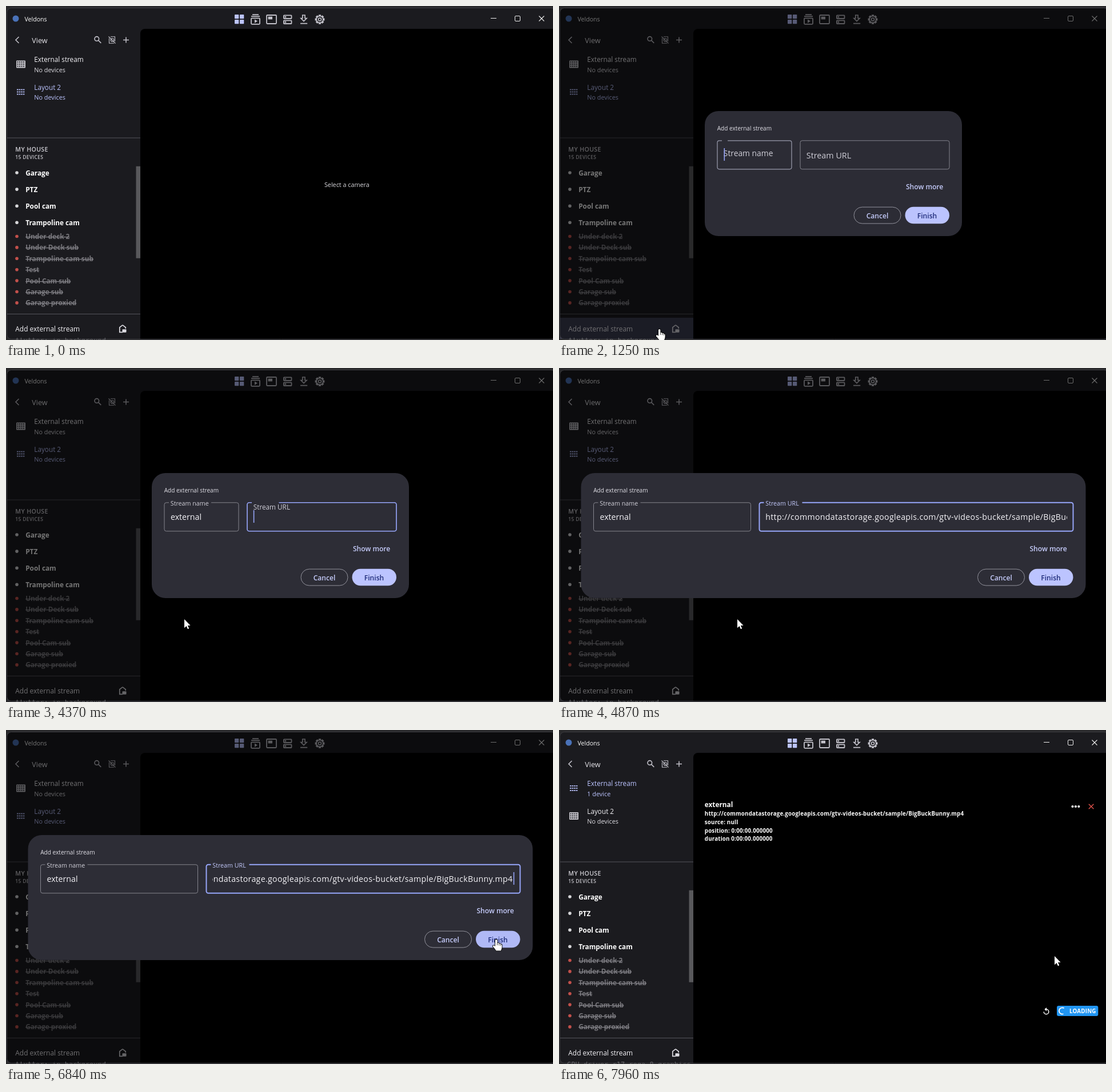
Animation, 957 px wide and 585 px high, one loop 8000 ms. Source, as an HTML page with a canvas:

```html
<!DOCTYPE html>
<html lang="en">
<head>
<meta charset="utf-8">
<title>Camera viewer</title>
<style>
html, body { margin: 0; width: 100%; height: 100%; overflow: hidden; background: #000; }
canvas { display: block; }
</style>
</head>
<body>
<canvas id="stage" width="957" height="585"></canvas>
<script>
const c = document.getElementById('stage').getContext('2d');
const LOOP = 8000;
const BG = '#1b1b1f', DIALOG = '#2d2d36', LILAC = '#bcc4ff', FOCUS = '#97a6fa';
const LINE = '#85858e', ICON = '#c3c2ca', TEXT = '#f4f3f7', RULE = '#55545c';
const URL_TEXT = 'http://commondatastorage.googleapis.com/gtv-videos-bucket/sample/BigBuckBunny.mp4';
const CAMS = ['Garage', 'PTZ', 'Pool cam', 'Trampoline cam'];
const OFFLINE = ['Under deck 2', 'Under Deck sub', 'Trampoline cam sub', 'Test',
  'Pool Cam sub', 'Garage sub', 'Garage proxied'];
const TYPED = [3080, 3200, 3300, 3400, 3570, 3600, 3770, 3920];
// Times at which the text caret switches on and off in turn.
const BLINKS = [1215, 1700, 2200, 2680, 3080, 5440, 5950, 6400, 6840, 7400];
const MOUSE = [
  [500, 184, 586], [750, 176, 566], [1620, 176, 566], [2400, 285, 456],
  [2600, 285, 456], [2740, 312, 440], [5290, 312, 440], [5480, 612, 409],
  [5620, 612, 409], [6070, 846, 407], [6220, 846, 407], [6580, 858, 367],
  [7750, 858, 367], [7960, 867, 396]];

const clamp = v => Math.max(0, Math.min(1, v));
const ramp = (t, a, b) => clamp((t - a) / (b - a));
const mix = (a, b, p) => a + (b - a) * p;
const smooth = p => p * p * (3 - 2 * p);
const easeOut = p => 1 - (1 - p) ** 2.4;

function setFont(size, weight = 400, gap = 0) {
  c.font = `${weight} ${size}px "Open Sans", "Noto Sans", sans-serif`;
  c.letterSpacing = gap + 'px';
}
function text(s, x, y, size, color = TEXT, weight = 400, gap = 0, align = 'left') {
  setFont(size, weight, gap);
  c.textAlign = align;
  c.fillStyle = color;
  c.fillText(s, x, Math.round(y));
  return c.measureText(s).width;
}
function box(x, y, w, h, color, r = 0) {
  c.fillStyle = color;
  c.beginPath();
  c.roundRect(x, y, w, h, r);
  c.fill();
}
function frame(x, y, w, h, color, r = 0, lw = 1) {
  c.strokeStyle = color;
  c.lineWidth = lw;
  c.beginPath();
  c.roundRect(x, y, w, h, r);
  c.stroke();
}
function dot(x, y, r, color) {
  c.fillStyle = color;
  c.beginPath();
  c.arc(x, y, r, 0, 7);
  c.fill();
}
function arc(x, y, r, from, to, color, lw) {
  c.strokeStyle = color;
  c.lineWidth = lw;
  c.beginPath();
  c.arc(x, y, r, from, to);
  c.stroke();
}
function path(d, x, y, color, lw = 0) {
  c.save();
  c.translate(x, y);
  const p = new Path2D(d);
  if (lw) {
    c.strokeStyle = color;
    c.lineWidth = lw;
    c.stroke(p);
  } else {
    c.fillStyle = color;
    c.fill(p);
  }
  c.restore();
}

function gear(x, y) {
  c.fillStyle = ICON;
  c.beginPath();
  for (let i = 0; i < 8; i++) {
    for (const [a, r] of [[-.36, 6.3], [-.23, 8.6], [.23, 8.6], [.36, 6.3]]) {
      const q = i * Math.PI / 4 + a;
      c.lineTo(x + r * Math.cos(q), y + r * Math.sin(q));
    }
  }
  c.closePath();
  c.moveTo(x + 5, y);
  c.arc(x, y, 5, 0, 2 * Math.PI, true);
  c.fill();
  arc(x, y, 2.5, 0, 7, ICON, 1.6);
}

function titleBar() {
  dot(17, 22, 5.5, '#4a72b8');
  text('Veldons', 32.5, 27, 10.6, '#fff');
  for (const x of [400, 409]) for (const y of [15, 24]) box(x, y, 7.3, 7.3, LILAC, .8);
  frame(429, 21.4, 15, 10.4, ICON, 1.2, 1.8);
  path('M429 18.2H444M431 15.2H442', 0, 0, ICON, 1.7);
  path('M435 23.5V29.7L440 26.6Z', 0, 0, ICON);
  frame(456, 16, 17, 15, ICON, 1.2, 1.8);
  box(458.6, 18.6, 7.4, 4.8, ICON);
  for (const y of [16.3, 25.3]) {
    frame(485.9, y, 13.6, 5.7, ICON, .8, 1.8);
    dot(488.9, y + 2.85, 1.3, ICON);
  }
  path('M518.8 16H523V21.5H526L521 26.5L516 21.5H518.8ZM515 30.6H527.2', 0, 0, ICON, 1.7);
  gear(549, 23.5);
  path('M848 21.5H858', 0, 0, '#eee', 1);
  frame(890.5, 17.5, 9, 9, '#eee', 1.5);
  path('M932.5 17.5L941.5 26.5M941.5 17.5L932.5 26.5', 0, 0, '#eee', 1.1);
}

function layoutRow(name, sub, y, active) {
  text(name, 49.3, y + 4, 11.75, active ? LILAC : TEXT);
  text(sub, 49.3, y + 21.8, 10.85, active ? LILAC : '#dedde3');
  if (active) {
    for (let i = 0; i < 12; i++) box(19 + i % 4 * 3.6, y + 3 + (i / 4 | 0) * 4, 2.6, 1.8, LILAC);
  } else {
    box(18, y + 1.5, 16, 13, '#c8c7cd', 1);
    for (let i = 0; i < 12; i++) box(19.4 + i % 4 * 3.5, y + 3 + (i / 4 | 0) * 3.7, 2.2, 2.2, '#3a3a40');
  }
}

function sidebar(t, added) {
  path('M22.5 54L17 59.5L22.5 65', 0, 0, ICON, 1.6);
  text('View', 45.3, 64.6, 12.6, '#e6e5ea');
  arc(158.8, 57.4, 3.8, 0, 7, ICON, 1.6);
  path('M161.6 60.2L166.3 64.9', 0, 0, ICON, 1.6);
  path('M180.5 56.5V65.3H189M183 53.7H190.5V62M179.5 53.5L191.5 65.5', 0, 0, ICON, 1.1);
  arc(186, 59.5, 2.8, 0, 7, ICON, 1.1);
  path('M205 59.5H215M210 54.5V64.5', 0, 0, ICON, 1.5);

  layoutRow('External stream', added ? '1 device' : 'No devices', 94, added);
  layoutRow('Layout 2', 'No devices', 142.6, !added);
  box(2, 230.5, 233, 1, RULE);
  text('MY HOUSE', 16.3, 255, 10.6, '#cfced4', 600, .35);
  text('15 DEVICES', 16.3, 268, 8.5, '#c6c5cb', 600, .35);
  CAMS.forEach((s, i) => {
    dot(19, 292 + i * 29.1, 2.8, '#d6d6d8');
    text(s, 34.2, 297 + i * 29.1, 11.8, '#fff', 700);
  });
  OFFLINE.forEach((s, i) => {
    const y = 404 + i * 19.4;
    dot(19, y - .5, 2.8, '#c2504b');
    const w = text(s, 34.2, y + 4, 11.8, '#77767b', 700);
    box(34.2, Math.round(y), w, 1.2, '#85848a');
  });
  box(227.5, 280.7, 7.5, 161, '#58585b');
  const press = ramp(t, 1020, 1090) * (1 - ramp(t, 1290, 1430));
  if (press) {
    c.globalAlpha = press;
    box(2, 546, 233, 37, '#3b3c51');
    c.globalAlpha = 1;
  }
  box(2, 539, 233, 1, RULE);
  text('Add external stream', 16.3, 569.6, 11.95);
  path('M204 558.8L198.8 562.8V571.3H204M204 558.8L209.2 562.8V565', 0, 0, '#dddce2', 1.7);
  box(203.5, 566.3, 7, 5.5, '#dddce2', 1);
}

function player(t) {
  text('external', 254.8, 135, 11.8, '#fff', 700);
  [URL_TEXT, 'source: null', 'position: 0:00:00.000000', 'duration 0:00:00.000000']
    .forEach((s, i) => text(s, 254.8, 150.3 + i * 14.6, 9.75, '#fff', 700, .18));
  for (let i = 0; i < 3; i++) dot(898.5 + i * 5.4, 134, 2.1, '#fff');
  path('M926.8 129.7L935.4 138.3M935.4 129.7L926.8 138.3', 0, 0, '#d8504a', 1.5);
  arc(852.5, 493.5, 4.3, -Math.PI / 2, Math.PI, '#fff', 1.5);
  path('M853 486V492.4L849.4 489.2Z', 0, 0, '#fff');
  box(871, 483, 72.3, 18, '#2196f3', 3);
  const a = (t - 7960) / 220;
  arc(880.5, 492, 5.6, a + 1.2, a + 5.3, '#fff', 1.8);
  text('LOADING', 893, 496.4, 9.8, '#fff', 700, .2);
}

// Outlined input whose label rises into a notch as p goes from 0 to 1.
function field(x, w, label, p, focus, notch) {
  const r = 3.5, top = 235.8, bottom = 285.8, right = x + w;
  c.strokeStyle = focus > .5 ? FOCUS : focus > 0 ? '#9a9cae' : LINE;
  c.lineWidth = 1 + focus;
  c.beginPath();
  c.moveTo(x + 8 + notch * p, top);
  c.arcTo(right, top, right, bottom, r);
  c.arcTo(right, bottom, x, bottom, r);
  c.arcTo(x, bottom, x, top, r);
  c.arcTo(x, top, right, top, r);
  c.lineTo(x + 8, top);
  c.stroke();
  text(label, x + 10.8, mix(266.8, 240.8, p), mix(14.35, 10.7, p), focus > .9 ? '#c3c9fb' : '#d0cfd8');
}

function dialog(t, alpha) {
  const wide = t >= 4780, onUrl = t >= 4370;
  const x = wide ? 38.5 : 255, right = wide ? 921.5 : 705;
  const nameW = wide ? 275 : 130, urlX = x + 22 + nameW + 15, urlW = right - 22 - urlX;
  c.globalAlpha = alpha;
  box(x, 184, right - x, 219, DIALOG, 24);
  text('Add external stream', x + 21.7, 218, 10.1, '#e0dfe6');

  const nameP = ramp(t, 1212, 1380);
  const urlP = onUrl ? mix(.64, 1, ramp(t, 4370, 4500)) : 0;
  field(x + 22, nameW, 'Stream name', smooth(nameP), onUrl ? 0 : nameP, 74);
  field(urlX, urlW, 'Stream URL', smooth(urlP), urlP, 67);

  const typed = 'external'.slice(0, TYPED.filter(k => k <= t).length);
  const nameEnd = x + 33.5 + text(typed, x + 33, 266, 14.2);
  let caretX = onUrl ? urlX + 10.8 : nameEnd;
  if (wide) {
    const view = urlW - 22, gap = .3;
    c.save();
    c.beginPath();
    c.rect(urlX + 10.5, 245, view + 1, 34);
    c.clip();
    setFont(14.2, 400, gap);
    const over = c.measureText(URL_TEXT).width + 2 - view;
    const scroll = t < 4930 ? 0 : over * easeOut(ramp(t, 4880, 4980));
    text(URL_TEXT, urlX + 10.8 - scroll, 266, 14.2, TEXT, 400, gap);
    c.restore();
    caretX = right - 33.8;
  }
  const lit = BLINKS.filter(b => b <= t).length % 2;
  const offView = wide && t < 4930;
  if (lit && !offView) box(caretX, 249, 1.6, 22, FOCUS);

  text('Show more', right - 32.7, 320.6, 12.1, '#c6ccfb', 600, 0, 'right');
  frame(right - 189, 352.2, 82, 28.8, '#92929c', 14.4);
  text('Cancel', right - 148, 371.6, 12.1, '#c6ccfb', 600, 0, 'center');
  box(right - 99.5, 351.8, 77.5, 29.4, t >= 6500 ? '#b0b9f6' : LILAC, 14.7);
  const wave = ramp(t, 7330, 7570);
  if (wave) {
    c.save();
    c.beginPath();
    c.roundRect(right - 99.5, 351.8, 77.5, 29.4, 14.7);
    c.clip();
    dot(right - 62, 367, 8 + 40 * wave, 'rgba(28,40,120,.12)');
    c.restore();
  }
  text('Finish', right - 61, 371.6, 12.1, '#1f2c79', 600, 0, 'center');
  c.globalAlpha = 1;
}

function pointer(t) {
  if (t < 500) return;
  let i = 0;
  while (i < MOUSE.length - 2 && t > MOUSE[i + 1][0]) i++;
  const [t0, x0, y0] = MOUSE[i], [t1, x1, y1] = MOUSE[i + 1];
  const p = smooth(ramp(t, t0, t1));
  const x = mix(x0, x1, p), y = mix(y0, y1, p);
  const hand = (t < 2000 && y > 545) || (x > 821 && y < 381);
  const d = hand
    ? 'M-2 1.5Q-2 0 -.3 0Q1.4 0 1.4 1.6V6.4Q4 5.4 4.6 7.2Q6.8 6.4 7.3 8.2Q9.6 7.8 9.6 10.2V13.6Q9.6 16 7.9 19.4H-.5Q-2 16.5 -6 12.4Q-6.6 10.6 -4.6 10.3Q-3.2 10.6 -2 12Z'
    : 'M0 0V15.2L3.6 11.9L6 17.3L8.2 16.3L5.9 11.1H10.6Z';
  path(d, x, y, '#000', 1.8);
  path(d, x, y, '#fff');
  if (hand) path('M1.4 6.4V10M4.6 7.4V10.3M7.3 8.4V10.8', x, y, '#222', .9);
}

// Console line peeking out under the window.
function consoleLine(t) {
  c.save();
  c.beginPath();
  c.rect(0, 581, 235, 4);
  c.clip();
  c.font = '12px "DejaVu Sans Mono", monospace';
  c.letterSpacing = '0px';
  c.textAlign = 'left';
  c.fillStyle = '#68686c';
  if (t < 7400) c.fillText('flutter: in background', 16, 589.5);
  else c.fillText('GPU driver r17 rega 8 graphics', 14, 589.5);
  c.restore();
}

function draw(t) {
  const added = t >= 7750;
  box(0, 0, 957, 585, '#29292b');
  box(1.5, 3.5, 960, 580, BG, 8);
  titleBar();
  box(235, 40, 722, 543.5, '#000', [8, 0, 0, 0]);
  if (added) player(t);
  else text('Select a camera', 596.3, 317, 10.8, '#d8d7dc', 400, 0, 'center');
  sidebar(t, added);

  const open = easeOut(ramp(t, 1085, 1270)) * (1 - ramp(t, 7740, 7930));
  if (open > 0) {
    c.globalAlpha = .54 * open;
    box(1.5, 3.5, 960, 580, '#000', 8);
    c.globalAlpha = 1;
    dialog(t, open);
  }
  frame(1.5, 3.5, 960, 580, '#3d3d42', 8);
  consoleLine(t);
  pointer(t);
}

function tick(now) {
  draw(now % LOOP);
  requestAnimationFrame(tick);
}
requestAnimationFrame(tick);
</script>
</body>
</html>
```
